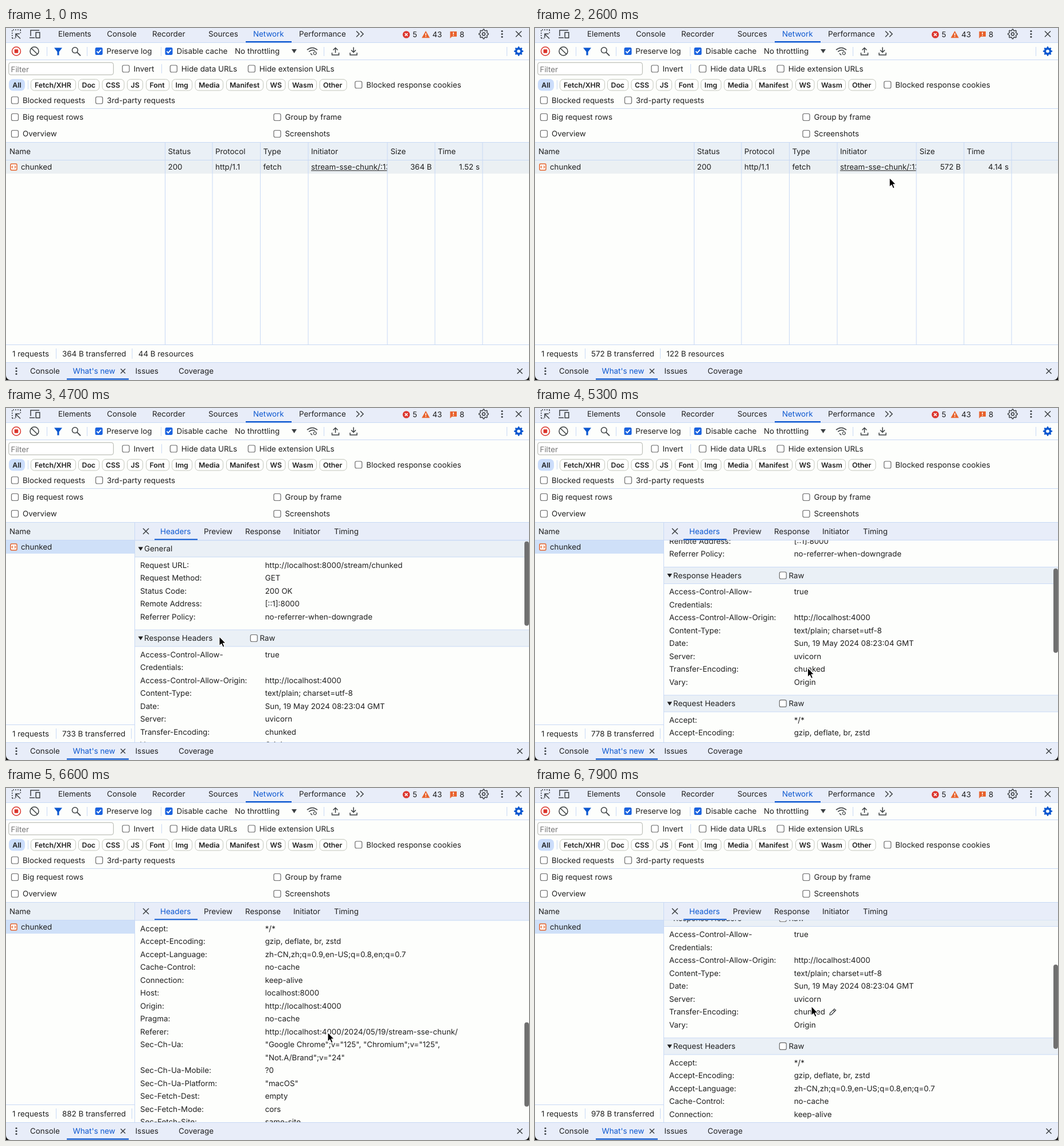
Write an HTML page that moves like this. It is 912x614 px and loops after 8000 ms.

```html
<!DOCTYPE html>
<html lang="en">
<head>
<meta charset="utf-8">
<title>Network panel</title>
<style>
  html, body { margin: 0; width: 100%; height: 100%; overflow: hidden; background: #fdfefc; }
  svg { display: block; width: 912px; height: 614px; }
  text { font: 13.35px Inter, "Open Sans", sans-serif; fill: #1f1f1f; white-space: pre; text-rendering: geometricPrecision; }
  .chip { font-size: 12.3px; font-weight: 600; }
  .blue { fill: #0b57d0; }
  .muted { fill: #757575; }
  .end { text-anchor: end; }
  .icon { fill: none; stroke: #3c4043; stroke-width: 1.5; }
  .rule { fill: none; stroke: #c8d9f5; stroke-width: 1; }
</style>
</head>
<body>
<svg id="stage" viewBox="0 0 912 614"></svg>
<script>
const LOOP = 8000, STEP = 100, OPEN_AT = 4200, ROW = 22.47;
const BAR = '#e8edf9', HEAD = '#eaf0f6', PAPER = '#fdfefc';

// ---- drawing helpers; y is the vertical centre of a line of text
const text = (x, y, s, cls = '', id = '') =>
  `<text x="${x}" y="${y + 4.8}" class="${cls}"${id && ` id="${id}"`}>${s}</text>`;
const rect = (x, y, w, h, fill, more = '') =>
  `<rect x="${x}" y="${y}" width="${w}" height="${h}" fill="${fill}" ${more}/>`;
const icon = (d, more = '') => `<path class="icon" d="${d}" ${more}/>`;
const rule = d => `<path class="rule" d="${d}"/>`;
const solid = (d, fill) => `<path d="${d}" fill="${fill}"/>`;
const cross = (x, y, r) => icon(`M${x - r} ${y - r}l${2 * r} ${2 * r}m0 ${-2 * r}l${-2 * r} ${2 * r}`);
const dots = (x, y) => [-5, 0, 5].map(d => `<circle cx="${x}" cy="${y + d}" r="1.6" fill="#3c4043"/>`).join('');

function checkbox(x, y, label, gap = 13.5, checked = false) {
  const box = checked
    ? rect(x - 6.5, y - 6.5, 13, 13, '#1a63e0', 'rx="2.5"') +
      icon(`M${x - 3.6} ${y + .2}l2.5 2.7 4.8-5.6`, 'style="stroke:#fff;stroke-width:1.8"')
    : rect(x - 6, y - 6, 12, 12, '#fff', 'rx="2.5" stroke="#6b6b6b" stroke-width="1.2"');
  return box + text(x + gap, y, label);
}

function gear(x, y, filled) {
  let d = '';
  for (let i = 0; i < 32; i++) {
    const a = (i - .5) * Math.PI / 16, r = i % 4 < 2 ? 8.2 : 6.2;
    d += `${i ? 'L' : 'M'}${(x + r * Math.cos(a)).toFixed(1)} ${(y + r * Math.sin(a)).toFixed(1)}`;
  }
  return filled
    ? solid(d + 'Z', '#0b57d0') + `<circle cx="${x}" cy="${y}" r="2.8" fill="${PAPER}"/>`
    : icon(d + 'Z', 'style="stroke-width:1.4" stroke-linejoin="round"') +
      `<circle cx="${x}" cy="${y}" r="2.5" class="icon"/>`;
}

const fileIcon = rect(8, 237, 11, 11, '#fff', 'rx="1.5" stroke="#e5622a" stroke-width="1.5"') +
  icon('M12.2 240.3l-2 2.2 2 2.2m2.6-4.4l2 2.2-2 2.2', 'style="stroke:#e5622a;stroke-width:1.2"');

// ---- fixed interface
function tabBar() {
  const tabs = [[91, 'Elements'], [176, 'Console'], [255, 'Recorder'], [353, 'Sources'], [431, 'Network'], [511, 'Performance']];
  return rect(0, 0, 912, 25, BAR) + rule('M0 25.5H912') + rect(418, 23, 80, 2.3, '#0b57d0') +
    tabs.map(([x, s]) => text(x, 10.5, s, s === 'Network' ? 'blue' : '')).join('') +
    icon('M10.8 18V3.2H26', 'stroke-dasharray="2 2"') + icon('M25.3 3.2V9M10.8 18H16', 'stroke-dasharray="2 2"') +
    icon('M25 18.5l-8-8m0 6.5v-6.8h6.8') +
    icon('M43 14V4H58M41 17H50') + rect(52.2, 7.7, 6.6, 9.6, 'none', 'stroke="#3c4043" stroke-width="1.5"') +
    icon('M611 5.5l5 5-5 5m7-10l5 5-5 5') +
    '<circle cx="698" cy="11.5" r="6.3" fill="#dc362e"/>' +
    icon('M695.6 9.1l4.8 4.8m0-4.8l-4.8 4.8', 'style="stroke:#fff"') +
    solid('M732 5l7 12.2h-14Z', '#e8622c') + rect(731.3, 9, 1.5, 4, '#fff') + rect(731.3, 14, 1.5, 1.5, '#fff') +
    solid('M774.5 6h11.5v9h-8.5l-3 3Z', '#e8622c') + rect(779.5, 7.5, 1.5, 3.6, '#fff') + rect(779.5, 12.2, 1.5, 1.5, '#fff') +
    text(709, 11.5, '5') + text(743.5, 11.5, '43') + text(791, 11.5, '8') +
    gear(833, 10.5) + dots(865, 10.5) + cross(894, 10.5, 5);
}

function toolbar() {
  const arrow = 'V47h12v-4';
  return '<circle cx="18" cy="40.5" r="7.5" class="icon" style="stroke:#dc362e"/>' + rect(14.7, 37.2, 6.6, 6.6, '#dc362e', 'rx="1"') +
    '<circle cx="49.5" cy="40.5" r="7.5" class="icon"/>' + icon('M44.2 35.2l10.6 10.6') +
    solid('M84 34.5h14l-5.4 7v6h-3.2v-6Z', '#0b57d0') +
    '<circle cx="120.3" cy="38.7" r="4.9" class="icon"/>' + icon('M124 42.3l6 6', 'style="stroke-width:1.8"') +
    checkbox(162, 40.5, 'Preserve log', 13.2, true) + checkbox(284, 40.5, 'Disable cache', 13.5, true) +
    text(399, 40.5, 'No throttling') + solid('M498 37h9l-4.5 7Z', '#3c4043') +
    icon('M525 38.2q9-7.5 18 0M528.2 41.3q5.6-4.6 10.5-1.4M531 44.2l3 3') +
    '<circle cx="538.7" cy="44" r="2.5" class="icon" stroke-dasharray="1.5 .5"/>' +
    icon('M568.5 43' + arrow + 'M574.5 43.5v-9m-4 4l4-4 4 4') +
    icon('M600 43' + arrow + 'M606 33.5v9m-4-4l4 4 4-4') +
    gear(894, 40.5, true) + rule('M0 55.5H912') +
    rule('M71.5 33v16M141.5 33v16M270.5 33v16M554.5 33v16M873.5 33v16');
}

function filters() {
  const chips = [[43.5, 78, 50, 'Fetch/XHR'], [126.5, 36, 132.5, 'Doc'], [168, 38, 174, 'CSS'], [211.5, 27, 217.5, 'JS'],
    [244.5, 40, 250.5, 'Font'], [289.5, 35, 295.5, 'Img'], [330, 48.5, 336, 'Media'], [384.5, 64, 390, 'Manifest'],
    [454.5, 32.5, 460.5, 'WS'], [492.5, 49, 499, 'Wasm'], [547, 47, 553, 'Other']];
  return rect(4.8, 60.3, 182.5, 21.4, '#fff', 'rx="3.5" stroke="#b0b3ab"') + text(8.5, 72, 'Filter', 'muted') +
    checkbox(209, 71, 'Invert') + rule('M271.5 63v16') + checkbox(292.3, 71, 'Hide data URLs') + checkbox(428.3, 71, 'Hide extension URLs') +
    rect(5, 89, 28, 20.5, '#cbddfb', 'rx="7"') + text(11.3, 98.7, 'All', 'chip') + rule('M38.5 91v16') +
    chips.map(([x, w, tx, s]) => rect(x, 89.5, w, 19.5, '#fff', 'rx="6" stroke="#c2c5bb"') + text(tx, 98.7, s, 'chip')).join('') +
    checkbox(614.7, 99, 'Blocked response cookies') +
    checkbox(15.5, 126, 'Blocked requests') + checkbox(162.5, 126, '3rd-party requests') + rule('M0 140.5H912') +
    checkbox(15.5, 155.5, 'Big request rows') + checkbox(473, 155.5, 'Group by frame') +
    checkbox(15.5, 184.5, 'Overview') + checkbox(473, 184.5, 'Screenshots') + rule('M0 199.5H912');
}

const drawer = () => rect(0, 583.5, 912, 30.5, BAR) + rule('M0 583.5H912') + dots(18, 598.5) +
  text(42, 598.5, 'Console') + text(116.5, 598.5, "What's new", 'blue') + cross(204, 598.5, 4) +
  text(225.5, 598.5, 'Issues') + text(301, 598.5, 'Coverage') + cross(896, 598.5, 4.5) +
  rect(106, 611.3, 108, 2.2, '#0b57d0') +
  solid('M0 606V614H8A8 8 0 0 1 0 606ZM912 606V614H904A8 8 0 0 0 912 606Z', '#111');

// ---- request table
function table() {
  const columns = [[6, 'Name'], [282.5, 'Status'], [365, 'Protocol'], [448.5, 'Type'], [532, 'Initiator'], [670.5, 'Size'], [753, 'Time']];
  return rect(0, 200, 912, 30, HEAD) + rect(0, 230.5, 912, 23.5, '#ebf0f3', 'id="row"') +
    columns.map(([x, s]) => text(x, 215, s)).join('') +
    rule('M0 230.5H912M0 552.5H912' + [277.5, 360, 443.5, 527, 665, 748, 831].map(x => `M${x} 200V553`).join('')) +
    fileIcon + text(26, 242.5, 'chunked') + text(282.5, 242.5, '200') + text(365, 242.5, 'http/1.1') + text(448.5, 242.5, 'fetch') +
    `<g clip-path="url(#initiator)">${text(532, 242.5, 'stream-sse-chunk/:138')}${rect(532, 248.3, 133, 1, '#1f1f1f')}</g>` +
    text(742.5, 242.5, '', 'end', 'size') + text(826, 242.5, '', 'end', 'time');
}

// ---- details pane
const sections = [
  ['General', [
    ['Request URL:', 'http://localhost:8000/stream/chunked'], ['Request Method:', 'GET'], ['Status Code:', '200 OK'],
    ['Remote Address:', '[::1]:8000'], ['Referrer Policy:', 'no-referrer-when-downgrade']]],
  ['Response Headers', [
    ['Access-Control-Allow-\nCredentials:', 'true'], ['Access-Control-Allow-Origin:', 'http://localhost:4000'],
    ['Content-Type:', 'text/plain; charset=utf-8'], ['Date:', 'Sun, 19 May 2024 08:23:04 GMT'], ['Server:', 'uvicorn'],
    ['Transfer-Encoding:', 'chunked'], ['Vary:', 'Origin']]],
  ['Request Headers', [
    ['Accept:', '*/*'], ['Accept-Encoding:', 'gzip, deflate, br, zstd'], ['Accept-Language:', 'zh-CN,zh;q=0.9,en-US;q=0.8,en;q=0.7'],
    ['Cache-Control:', 'no-cache'], ['Connection:', 'keep-alive'], ['Host:', 'localhost:8000'], ['Origin:', 'http://localhost:4000'],
    ['Pragma:', 'no-cache'], ['Referer:', 'http://localhost:4000/2024/05/19/stream-sse-chunk/'],
    ['Sec-Ch-Ua:', '"Google Chrome";v="125", "Chromium";v="125",\n"Not.A/Brand";v="24"'], ['Sec-Ch-Ua-Mobile:', '?0'],
    ['Sec-Ch-Ua-Platform:', '"macOS"'], ['Sec-Fetch-Dest:', 'empty'], ['Sec-Fetch-Mode:', 'cors'], ['Sec-Fetch-Site:', 'same-site'],
    ['User-Agent:', 'Mozilla/5.0 (Macintosh; Intel Mac OS X 10_15_7)\nAppleWebKit/537.36 (KHTML, like Gecko) Chrome/125.0.0.0']]]];

function headerList() {
  let y = 245.4, out = '';
  for (const [title, rows] of sections) {
    out += rect(225, y - 14.5, 687, 29, HEAD) + rule(`M225 ${y - 14.5}H912M225 ${y + 14.5}H912`) +
      solid(`M230.5 ${y - 3}h8.5l-4.2 6.5Z`, '#1f1f1f') + text(241, y, title);
    if (title !== 'General') out += checkbox(432.3, y, 'Raw', 10.3);
    y += 28.7;
    for (const [name, value] of rows) {
      const lines = [name, value].map(s => s.split('\n'));
      lines.forEach((part, col) => part.forEach((s, i) => out += text(col ? 451.7 : 234, y + i * ROW, s)));
      if (name.startsWith('Transfer'))
        out += icon(`M514 ${y + 5.3}l.5-3 7.5-7.5 2.5 2.5-7.5 7.5ZM520 ${y - 3.2}l2.5 2.5`, 'id="pencil" style="stroke-width:1.3"');
      y += ROW * Math.max(...lines.map(part => part.length));
    }
    y += 37.5 - ROW;
  }
  return out;
}

function details() {
  const tabs = [[269, 'Headers'], [345, 'Preview'], [417, 'Response'], [501, 'Initiator'], [572, 'Timing']];
  return rect(0, 200, 912, 383, PAPER) + rect(0, 200, 224, 30, HEAD) + rect(0, 230.5, 224, 23.5, '#cfe0f8') +
    text(6, 215, 'Name') + fileIcon + text(26, 242.5, 'chunked') +
    rect(225, 200, 687, 30, BAR) + cross(244, 215, 5) + rect(259, 228.3, 75, 2.2, '#0b57d0') +
    tabs.map(([x, s], i) => text(x, 215, s, i ? '' : 'blue')).join('') +
    rule('M0 230.5H259M334 230.5H912M0 552.5H224') +
    `<g clip-path="url(#pane)"><g id="list">${headerList()}</g>` +
    rect(904, 233, 8, 147, '#707070', 'rx="4" id="thumb"') + '</g>' + rule('M224.5 200V583');
}

const status = () => text(11, 568, '1 requests') + rule('M87.5 559v18') +
  `<g id="status">${text(98, 568, '', '', 'sent')}<path id="divider" class="rule" d="M0 559v18"/>${text(232, 568, '', '', 'resources')}</g>`;

document.getElementById('stage').innerHTML =
  `<defs><clipPath id="initiator">${rect(527, 231, 137.5, 23)}</clipPath>
   <clipPath id="pane">${rect(225, 230.5, 687, 352.5)}</clipPath>
   <clipPath id="side">${rect(0, 553, 224, 30)}</clipPath></defs>` +
  rect(0, 0, 912, 614, PAPER) + tabBar() + toolbar() + filters() +
  `<g id="table">${table()}</g><g id="details">${details()}</g>` + status() + drawer() +
  '<path id="cursor" d="M0 0V16.3L3.7 12.8 6.3 18.7 9 17.5 6.5 11.8H11.4Z" fill="#000" stroke="#fff" stroke-width="1.1" stroke-linejoin="round"/>';

// ---- motion
const linear = k => k, smooth = k => k * k * (3 - 2 * k);
function track(keys, t, ease) {
  const i = keys.findIndex(key => key[0] > t);
  if (i === 0) return keys[0].slice(1);
  if (i < 0) return keys[keys.length - 1].slice(1);
  const a = keys[i - 1], b = keys[i], k = ease((t - a[0]) / (b[0] - a[0]));
  return a.slice(1).map((v, j) => v + (b[j + 1] - v) * k);
}

const cursorKeys = [[400, 650, -30], [900, 672, 251.5], [1500, 622, 261], [2700, 618, 261], [3700, 76, 243], [4300, 76, 243],
  [4900, 475.5, 453], [5300, 475.5, 453], [6200, 561, 426], [6800, 561, 426], [7600, 482, 380.5]];
const scrollKeys = [[4700, 0], [5200, 109.5], [5400, 109.5], [6400, 408.5], [6800, 408.5], [7500, 174.5]];
// time, bytes transferred, bytes of content, seconds elapsed
const byteKeys = [[0, 364, 44, 1.52], [900, 436, 71, 2.43], [2600, 572, 122, 4.14], [3800, 666, 156, 5.36],
  [5300, 778, 193, 6.88], [6600, 882, 232, 8.2], [7900, 978, 268, 9.52]];

const el = id => document.getElementById(id);
const show = (id, on) => el(id).style.display = on ? '' : 'none';

function draw(t) {
  const [x, y] = track(cursorKeys, t, smooth);
  const [scroll] = track(scrollKeys, t, smooth);
  const [sent, body, seconds] = track(byteKeys, t, linear);
  const open = t >= OPEN_AT;

  el('cursor').setAttribute('transform', `translate(${x} ${y})`);
  el('row').setAttribute('fill', y > 230 && y < 254 ? '#ecebea' : '#ebf0f3');
  el('size').textContent = `${Math.round(sent)} B`;
  el('time').textContent = `${seconds.toFixed(2)} s`;
  el('sent').textContent = `${Math.round(sent)} B transferred`;
  el('resources').textContent = `${Math.round(body)} B resources`;
  const end = 98 + el('sent').getComputedTextLength();
  el('divider').setAttribute('transform', `translate(${end + 10.5} 0)`);
  el('resources').setAttribute('x', end + 21.3);

  show('table', !open);
  show('details', open);
  open ? el('status').setAttribute('clip-path', 'url(#side)') : el('status').removeAttribute('clip-path');
  el('list').setAttribute('transform', `translate(0 ${-scroll})`);
  el('thumb').setAttribute('y', 232.8 + scroll * .431);
  show('pencil', t >= 7600);
}

function tick(now) {
  draw(Math.floor(now % LOOP / STEP) * STEP);
  requestAnimationFrame(tick);
}
draw(0);
requestAnimationFrame(tick);
</script>
</body>
</html>
```
